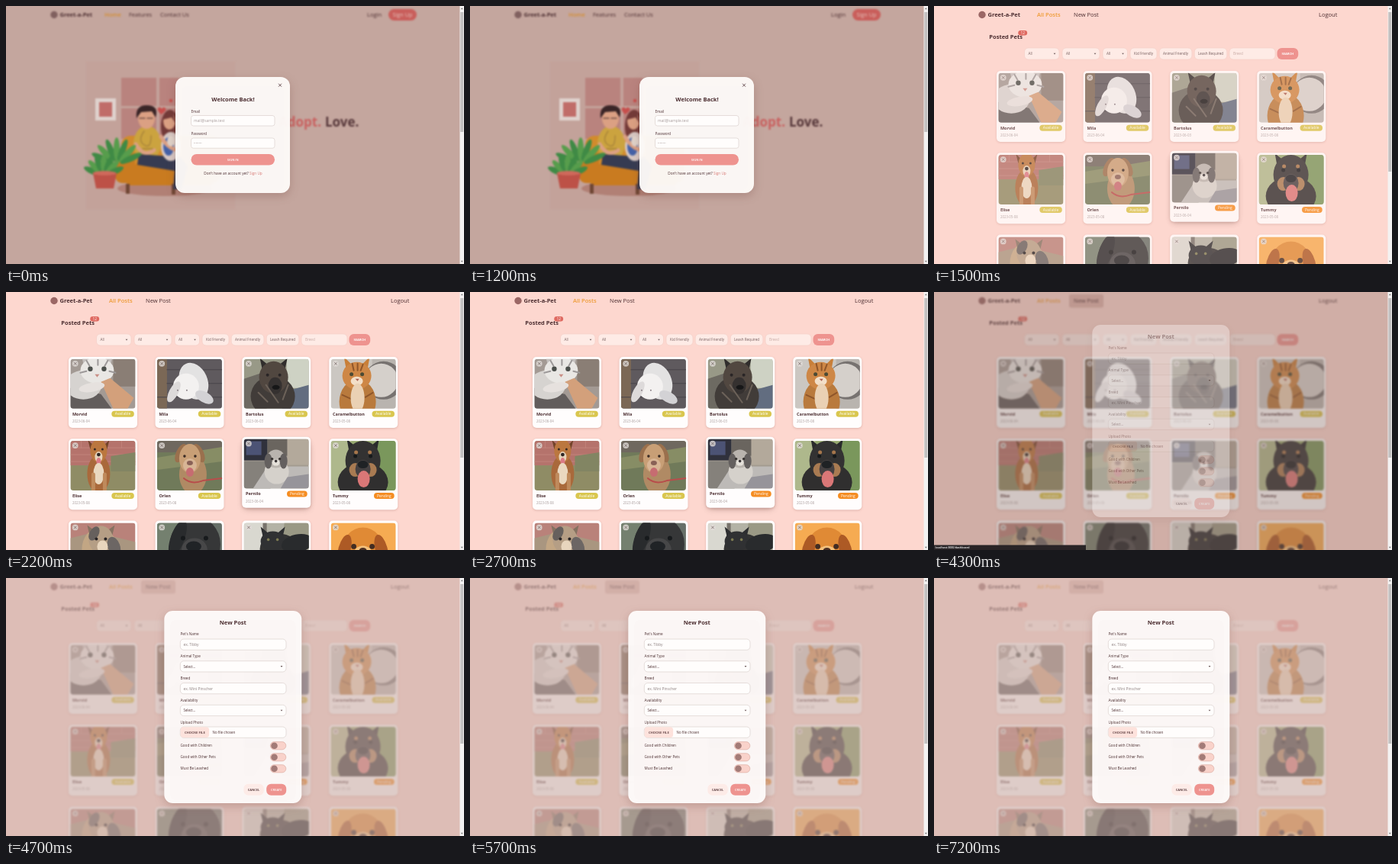
Write an HTML page that moves like this. It is 600x338 px and loops after 8 s.

```html
<!DOCTYPE html>
<html lang="en">
<head>
<meta charset="utf-8">
<title>Pet adoption demo</title>
<style>
html, body { margin: 0; width: 100%; height: 100%; overflow: hidden; background: #fdd7cf; }
svg { display: block; width: 600px; height: 338px; font-family: "Open Sans", sans-serif; }
.card { filter: drop-shadow(0 1px 1.5px rgba(120, 60, 50, .22)); }
.modal { filter: drop-shadow(0 4px 6px rgba(100, 50, 45, .25)); }
</style>
</head>
<body>
<svg id="stage" viewBox="0 0 600 338"></svg>
<script>
const INK = '#4b2d30', ORANGE = '#ee9b34', ROSE = '#ee938f', GREY = '#a79c9c';

const rect = (x, y, w, h, fill, r = 0, extra = '') =>
  `<rect x="${x}" y="${y}" width="${w}" height="${h}" rx="${r}" fill="${fill}" ${extra}/>`;
const oval = (x, y, rx, ry, fill, turn = 0) =>
  `<ellipse cx="${x}" cy="${y}" rx="${rx}" ry="${ry}" fill="${fill}" transform="rotate(${turn} ${x} ${y})"/>`;
const dot = (x, y, r, fill) => oval(x, y, r, r, fill);
const path = (d, fill) => `<path d="${d}" fill="${fill}"/>`;
const line = (d, color, w) =>
  `<path d="${d}" fill="none" stroke="${color}" stroke-width="${w}" stroke-linecap="round" stroke-linejoin="round"/>`;
const text = (s, x, y, size, fill = INK, weight = 400, anchor = 'start') =>
  `<text x="${x}" y="${y}" font-size="${size}" fill="${fill}" font-weight="${weight}" text-anchor="${anchor}">${s}</text>`;
const pill = (s, x, y, w, h, fill, color, size, weight = 400, r = h / 2) =>
  rect(x, y, w, h, fill, r) + text(s, x + w / 2, y + h / 2 + size * .36, size, color, weight, 'middle');
const box = (x, y, w, h, r) => rect(x, y, w, h, '#fffdfc', r, 'stroke="#d5c9c7" stroke-width=".6"');
const caret = (x, y) => path(`M${x - 1.4} ${y - .8}h2.8l-1.4 1.8z`, '#6d5a5a');
const cross = (x, y, r, color, w) =>
  line(`M${x - r} ${y - r}l${2 * r} ${2 * r}m0 ${-2 * r}l${-2 * r} ${2 * r}`, color, w);
const group = (id, body, extra = '') => `<g id="${id}" ${extra}>${body}</g>`;

const logo = color => dot(63, 11.5, 4.7, color) + text('Greet-a-Pet', 70.5, 14.2, 7.5, INK, 700);

// Landing page, already dimmed
function landing() {
  const skin = '#dba083', hair = '#3a2527', leaf = '#3f8a45';
  const leaves = (x, y, n, len) => Array.from({ length: n }, (_, i) => {
    const a = (i / (n - 1) - .5) * 2.3;
    const px = x + Math.sin(a) * len * .6, py = y - Math.cos(a) * len * .6;
    return oval(px, py, 4, len * .45, i % 2 ? '#579d4c' : leaf, a * 57);
  }).join('');
  return rect(0, 0, 600, 338, '#c4a69e') +
    group('landing', logo('#80605f') +
      text('Home', 129, 14.2, 7.5, '#d58d2d', 600) +
      text('Features', 161, 14.2, 7.5) + text('Contact Us', 202, 14.2, 7.5) +
      text('Login', 473, 14.2, 7.5) +
      pill('Sign Up', 501, 4, 37, 15, '#c95e5b', '#e5c5be', 7.3) +
      rect(105, 73, 195, 193, '#c3a29a') +
      rect(151, 94, 46, 37, '#b9837e') + rect(201, 94, 25, 37, '#b9837e') +
      rect(151, 134, 46, 40, '#b9837e') + rect(201, 134, 25, 40, '#b9837e') +
      rect(117, 121, 27, 29, '#dfd2cd') + rect(122, 126, 17, 19, '#c06d69') +
      oval(208, 239, 62, 10, '#b18075') +
      rect(151, 170, 130, 62, '#d28b2c', 12) + rect(143, 190, 26, 42, '#c97b20', 9) +
      rect(157, 207, 115, 28, '#c97b20', 6) +
      rect(157, 233, 5, 13, '#704735') + rect(217, 233, 5, 14, '#704735') +
      oval(185, 180, 18, 23, '#cba33f') + path('M174 194l55 4 9 12-8 30h-11l2-24-49-8z', '#363b52') +
      oval(184, 147, 11, 14, skin) + path('M171 147q-2-17 13-17 17 0 12 16l-5-8-14 1z', hair) +
      line('M175 147h7m3 0h7', hair, 1.2) +
      oval(215, 158, 12, 22, '#733a38') + oval(214, 151, 8, 11, skin) +
      path('M205 149q2-13 13-10l5 16-6-9z', '#733a38') +
      oval(216, 184, 13, 19, '#d7c8c4') + oval(213, 184, 7, 12, '#4361a8') +
      line('M170 181q10 18 24 8m9-18q7 13 18 17', skin, 5) +
      oval(216, 177, 5, 7, '#e0d3ca') +
      line('M181 164q-9 12 0 18t9-12m-11 17h13', '#a6823a', 1.3) +
      path('M203 142q-7-7-3-9 3-1 4 2 2-4 5-1 2 3-6 8z', '#c74e4c') +
      dot(216, 124, 2.2, '#c74e4c') +
      leaves(145, 208, 7, 34) + leaves(128, 223, 7, 27) +
      path('M114 219h31l-4 20h-23z', '#bd5147') + oval(129, 219, 15.5, 3, '#cf695b') +
      text('Adopt.', 413, 158, 17, '#c9605f', 700, 'end') + text('Love.', 418, 158, 17, '#56373a', 700),
      'style="filter:blur(.9px)"') +
    group('login', rect(222, 93, 150, 152, '#fdfaf8', 12, 'opacity=".97"') + cross(359, 103.7, 1.7, INK, .8) +
      text('Welcome Back!', 297.5, 125, 7.5, INK, 700, 'middle') +
      text('Email', 242.5, 139.5, 4.6) + box(242.5, 143.5, 109.5, 13.5, 3) +
      text('mail@sample.test', 246, 152, 4.9, GREY) +
      text('Password', 242.5, 169, 4.6) + box(242.5, 173, 109.5, 13.3, 3) +
      text('••••••••', 246, 181.4, 3.5, GREY) +
      pill('SIGN IN', 242.5, 194, 109.5, 14.5, ROSE, '#fff', 4, 600) +
      `<text x="297.5" y="221" font-size="4.7" fill="${INK}" text-anchor="middle">Don't have an account yet? <tspan fill="#d77873">Sign Up</tspan></text>`,
      'class="modal"');
}

// Photos, each on an 85 x 65 area
const eyes = (x, y, gap, color = '#292526', r = 2) => dot(x - gap, y, r, color) + dot(x + gap, y, r, color);
const ears = (x, y, w, h, color) =>
  path(`M${x - w} ${y}l-3 ${-h} ${w * .7} ${h * .6}zM${x + w} ${y}l3 ${-h} ${-w * .7} ${h * .6}z`, color);
const photos = [
  rect(0, 0, 85, 65, '#a39a94') + rect(56, 0, 29, 36, '#8a7e75') + path('M0 38l40 8 14 19H0z', '#625d5c') +
    oval(17, 34, 24, 19, '#d6d3d0') + ears(35, 6, 18, 12, '#c4bfbd') + oval(35, 15, 22, 17, '#e9e7e4') +
    line('M21 2l4 7m11-8v7m13-6l-4 7M13 18l8-2m30 0l8 2', '#9d9999', 2) +
    eyes(35, 13, 9, '#4b4f4b', 3.2) + path('M32 20h6l-3 4z', '#c98f86') +
    path('M40 30l12-5 31 26-8 14H56z', '#d3a07b') + oval(28, 37, 17, 6, '#e6e1de', -10),

  rect(0, 0, 85, 65, '#5f5a5e') + path('M0 0h13v65H0z', '#7b6856') +
    line('M13 14h72M13 32h72M0 50h85', '#484449', 1) + oval(48, 29, 18, 25, '#e3e2e2', -24) +
    oval(38, 36, 17, 17, '#f3f1f0') + oval(22, 43, 6, 15, '#dddada', 28) +
    oval(62, 50, 13, 7, '#d3d2d5', 30) + eyes(33, 41, 6, '#887e83', 1),

  rect(0, 0, 85, 65, '#989987') + rect(56, 0, 29, 38, '#ced2c4') + path('M50 65l10-24 25-7v31z', '#626d80') +
    path('M0 26l24-8 6 47H0z', '#6d6a62') +
    oval(38, 49, 29, 27, '#413c39') + ears(39, 13, 15, 14, '#302d2c') + oval(39, 24, 19, 21, '#514740') +
    oval(41, 35, 9, 11, '#353130') + eyes(39, 21, 8) + oval(42, 37, 5, 3, '#171718') +
    line('M19 44l12 12m-2-22l16 23m13-23l-7 19', '#6c6259', 2),

  rect(0, 0, 85, 65, '#cbc7c2') + rect(54, 0, 31, 65, '#b9b4af') + dot(69, 28, 25, '#777270') + dot(66, 28, 22, '#d5d0cb') +
    oval(35, 56, 24, 29, '#b97a3d') + ears(34, 13, 14, 16, '#c87f39') + oval(34, 22, 19, 18, '#ce8746') +
    line('M28 6l2 9m5-9v9m7-8l-3 8M15 47l11 5m29-8l-10 6', '#8f562a', 2) +
    eyes(34, 20, 7, '#4b4a34', 2.5) + oval(34, 29, 8, 6, '#f3dfc8') + path('M32 26h5l-2 3z', '#a95d52') +
    oval(35, 51, 9, 19, '#ead1b4'),

  rect(0, 0, 85, 65, '#8f8c65') + rect(0, 0, 85, 32, '#b5736c') +
    line('M0 9h85M0 18h85M0 27h85M14 0v9m28 0v9m25-18v9', '#c68a81', .7) +
    path('M53 20l32-5v25H53z', '#828563') + oval(37, 43, 15, 25, '#a9693b') +
    ears(37, 11, 11, 12, '#734329') + oval(37, 13, 11, 15, '#bb773f') + eyes(37, 11, 5, '#392a23', 1.5) +
    oval(37, 21, 5, 7, '#e7d3b9') + oval(37, 27, 3, 5, '#db7b85') + dot(37, 18, 2.4, '#2f2725') +
    oval(37, 43, 7, 14, '#ead8c0') + line('M30 44v20m15-20v20', '#bf8a5c', 5),

  rect(0, 0, 85, 65, '#707a5a') + rect(0, 0, 85, 15, '#6f685f') + path('M0 22L85 8v19L0 38z', '#878d65') +
    oval(47, 44, 18, 26, '#b08a64') + oval(31, 16, 6, 13, '#9a704d', 25) + oval(55, 16, 6, 13, '#9a704d', -25) +
    oval(43, 23, 14, 19, '#c89f76') + eyes(43, 20, 7, '#3c2d26', 1.8) + oval(43, 32, 9, 9, '#d8b595') +
    oval(43, 29, 4, 3, '#896156') + oval(43, 41, 5, 6, '#c66c71') + line('M35 49q10 9 25 3l25-3', '#b84d4b', 2),

  rect(0, 0, 85, 65, '#a39b90') + rect(0, 0, 31, 28, '#30313c') + rect(3, 3, 20, 18, '#4c5375') +
    rect(31, 0, 26, 22, '#6a655f') + rect(57, 0, 28, 34, '#b3a99b') + rect(0, 29, 35, 36, '#85817b') +
    path('M31 36h54v29H12z', '#bdbab7') + oval(43, 43, 16, 16, '#d5d1cb') + oval(42, 26, 12, 12, '#b9b4ae') +
    oval(32, 29, 5, 10, '#64605f') + oval(52, 29, 5, 10, '#64605f') + eyes(42, 26, 5, '#363230', 1.7) +
    oval(42, 31, 5, 4, '#e5e1da') + dot(42, 29, 1.8, '#383435') + path('M57 50l28-4v19H48z', '#96949a'),

  rect(0, 0, 85, 65, '#95a86e') + path('M0 0h27L13 65H0z', '#aeb88c') + path('M59 0h26v65H67z', '#7a975c') +
    oval(42, 54, 33, 26, '#302f2f') + ears(42, 15, 18, 17, '#292a2b') + oval(42, 26, 23, 26, '#333232') +
    eyes(42, 20, 10, '#16191b', 2.5) + dot(33, 15, 2.5, '#a6764b') + dot(51, 15, 2.5, '#a6764b') +
    oval(32, 38, 8, 9, '#a97b52') + oval(52, 38, 8, 9, '#a97b52') + oval(42, 37, 10, 12, '#454041') +
    oval(42, 31, 7, 5, '#1f2225') + oval(43, 50, 8, 11, '#da7777'),

  rect(0, 0, 85, 65, '#b9827a') + path('M0 20l32-8 53 13v40H0z', '#a99680') + oval(38, 35, 23, 29, '#c2a684') +
    ears(40, 16, 15, 13, '#857261') + oval(40, 22, 16, 18, '#b59e85') + oval(31, 14, 6, 10, '#66605d', 30) +
    oval(57, 31, 8, 13, '#6c6664', -20) + eyes(40, 21, 6) + oval(42, 31, 7, 8, '#e8d5bd'),

  rect(0, 0, 85, 65, '#666f68') + path('M0 0h33L19 65H0z', '#74806f') + oval(50, 28, 33, 36, '#363738') +
    oval(27, 20, 9, 25, '#292b2d', 20) + eyes(49, 20, 15, '#171a1c', 3) +
    oval(49, 36, 17, 16, '#474748') + oval(48, 31, 10, 7, '#202326'),

  rect(0, 0, 85, 65, '#b3b2a5') + rect(0, 0, 25, 65, '#d9d8d0') + rect(25, 0, 5, 65, '#77726b') +
    path('M53 0h32v35H50z', '#9a9985') + oval(46, 34, 25, 20, '#333') + ears(38, 18, 13, 13, '#2d2e30') +
    oval(38, 24, 16, 13, '#303133') + oval(70, 27, 21, 12, '#292b2d', -12) + eyes(38, 22, 6, '#7d7b52', 1.8),

  rect(0, 0, 85, 65, '#f6ab52') + oval(42, 36, 27, 30, '#e08a35') + oval(18, 34, 8, 19, '#ad5a25', 15) +
    oval(66, 34, 8, 19, '#ad5a25', -15) + eyes(42, 31, 12, '#422c22', 3.4) +
    oval(42, 42, 13, 12, '#f4c17d') + oval(42, 36, 5, 3.5, '#4c3024'),
];

const pets = ['Morvid 06-04', 'Mila 06-04', 'Bartolus 06-03', 'Caramelbutton 05-08',
  'Elise 05-08', 'Orlen 05-08', 'Pernilo 06-04', 'Tummy 05-08', 'Rusk 05-08', 'Inkle 05-08', 'Sooty 05-08', 'Biscuit 05-08'];

function card(pet, i) {
  const [name, date] = pet.split(' ');
  const x = [82, 195.5, 309.2, 423.2][i % 4], y = [85, 192.3, 299.6][i / 4 | 0];
  const pending = i == 6 || i == 7, raised = i == 6;
  const tag = pending ? pill('Pending', 58.8, 70.7, 26.7, 8, '#f58d22', '#fff', 4.9)
                      : pill('Available', 56.3, 70.7, 29.5, 8, '#d9c64e', '#fff', 4.9);
  const shade = raised ? rect(2, 8, 86, 86, '#5c3833', 5, 'id="shade" style="filter:blur(4px)"') : '';
  return `<g transform="translate(${x} ${y})"><g ${raised ? 'id="raised"' : ''}>${shade}<g class="card">` +
    rect(0, 0, 90, 93, '#fffdfd', 5) +
    `<g transform="translate(2.4 2.8)" clip-path="url(#photo)">${photos[i]}</g></g>` +
    dot(8.7, 8.8, 3.9, 'rgba(225,220,216,.8)') + cross(8.7, 8.8, 1.5, '#70605f', .7) +
    text(name, 4.9, 76.5, 5.5, INK, 700) + text('2023-' + date, 4.9, 86, 4.4, GREY) + tag + '</g></g>';
}

function dashboard() {
  const field = (x, w) => rect(x, 55, w, 15, '#feebe6', 5, 'stroke="#f1cdc5" stroke-width=".6"');
  const select = (x, w) => field(x, w) + text('All', x + 5, 64.3, 4.6, '#755e5e') + caret(x + w - 6, 62.6);
  const option = (s, x, w) => field(x, w) + text(s, x + w / 2, 64.3, 4.6, '#755e5e', 400, 'middle');
  return rect(177, 3, 45, 17.5, '#e0b3ab', 3, 'id="hover"') +
    logo('#9b6765') + text('All Posts', 135, 14.2, 7.5, ORANGE, 600) + text('New Post', 183, 14.2, 7.5) +
    text('Logout', 504, 14.2, 7.5) + text('Posted Pets', 72.3, 43.2, 7.5, INK, 700) +
    pill('12', 110.3, 32, 11.8, 6.4, '#df6960', '#fff', 4.8) +
    select(118.5, 45.5) + select(168, 49) + select(221, 32.5) +
    option('Kid Friendly', 257, 35) + option('Animal Friendly', 295.2, 42.7) + option('Leash Required', 341.2, 42.6) +
    field(387, 60) + text('Breed', 392, 64.3, 4.6, '#c8aaa5') +
    pill('SEARCH', 449.5, 55, 27.7, 15, ROSE, '#fff', 4.1, 700, 6) +
    group('cards', pets.map(card).join(''));
}

function newPost() {
  const label = (s, y) => text(s, 228.5, y, 4.6);
  const input = y => box(228.3, y, 138.7, 14.3, 4.5);
  const hint = (s, y) => input(y) + text(s, 232.5, y + 9, 4.9, '#8d8080');
  const select = y => input(y) + text('Select...', 232.5, y + 8.8, 4.4, INK) + caret(361, y + 7.2);
  const toggle = (s, y) => label(s, y + 1.6) +
    rect(346.3, y - 5.1, 20.5, 10.2, '#f9d2ca', 5.1, 'stroke="#d9a49b" stroke-width=".6"') + dot(351.5, y, 4.3, '#a37b77');
  return rect(207.3, 43, 180, 252, '#fefaf9', 11, 'opacity=".97"') +
    text('New Post', 297.3, 61, 7.5, INK, 700, 'middle') +
    label("Pet's Name", 75.2) + hint('ex. Tibby', 80) +
    label('Animal Type', 104.2) + select(108.7) +
    label('Breed', 133) + hint('ex. Mini Pinscher', 137.5) +
    label('Availability', 161.8) + select(166.3) +
    label('Upload Photo', 190.6) + input(195) +
    pill('CHOOSE FILE', 228.6, 195.3, 37.5, 13.7, '#fde2dc', INK, 4.3, 600, 4) +
    text('No file chosen', 270.5, 203.8, 4.5) +
    toggle('Good with Children', 219.7) + toggle('Good with Other Pets', 234.8) + toggle('Must Be Leashed', 249.8) +
    pill('CANCEL', 311.3, 269.8, 26.5, 15, '#fdebe7', INK, 4.1, 600, 6) +
    pill('CREATE', 341.2, 269.8, 26, 15, ROSE, '#fff', 4.1, 600, 6);
}

document.getElementById('stage').innerHTML =
  `<defs><clipPath id="photo">${rect(0, 0, 85.2, 65, '#000', 4)}</clipPath></defs>` +
  group('home', landing()) +
  group('dash', rect(0, 0, 600, 338, '#fdd7cf') + group('page', dashboard()) +
    rect(0, 0, 600, 338, '#fff', 0, 'id="veil"') + group('form', newPost(), 'class="modal"') +
    group('status', rect(0, 331.5, 199, 6.5, '#292426') + text('localhost:3000/dashboard', 1.5, 336.3, 3.6, '#fff', 600))) +
  rect(594.5, 0, 5.5, 338, '#f4f2f2') + rect(595.3, 8, 4, 157, '#c2c0c0', 0, 'id="thumb"') +
  path('M595.8 4.2h3l-1.5-2zM595.8 333.8h3l-1.5 2z', '#777');

const $ = id => document.getElementById(id);
const ramp = (t, from, to) => Math.max(0, Math.min(1, (t - from) / (to - from)));
const show = (id, on) => { $(id).style.display = on ? '' : 'none'; };
const SIGNED_IN = 1300, HOVER = 3800, CLICK = 4150;

function draw(now) {
  const t = now % 8000, home = t < SIGNED_IN;
  show('home', home);
  show('dash', !home);
  $('thumb').setAttribute('height', home ? 157 : 209);

  $('cards').style.opacity = 1 - (1 - ramp(t, SIGNED_IN, SIGNED_IN + 500)) ** 3;
  const lift = 1 - ramp(t, 2950, 3250);
  $('raised').setAttribute('transform', `translate(0 ${-2.5 * lift})`);
  $('shade').style.opacity = .42 * lift;

  // The page dims at once, then pales while the form fades in
  const dim = ramp(t, CLICK - 50, CLICK + 100), pale = ramp(t, CLICK + 150, CLICK + 400);
  const mix = (a, b) => a + (b - a) * pale;
  $('veil').style.fill = `rgb(${mix(134, 201)},${mix(109, 172)},${mix(101, 166)})`;
  $('veil').style.opacity = dim * mix(.38, .6);
  $('page').style.filter = dim ? `blur(${.85 * dim}px)` : 'none';
  $('form').style.opacity = ramp(t, CLICK, CLICK + 400);
  show('form', t > CLICK);
  show('hover', t >= HOVER);
  show('status', t >= HOVER && t < 4600);
  requestAnimationFrame(draw);
}
requestAnimationFrame(draw);
</script>
</body>
</html>
```
